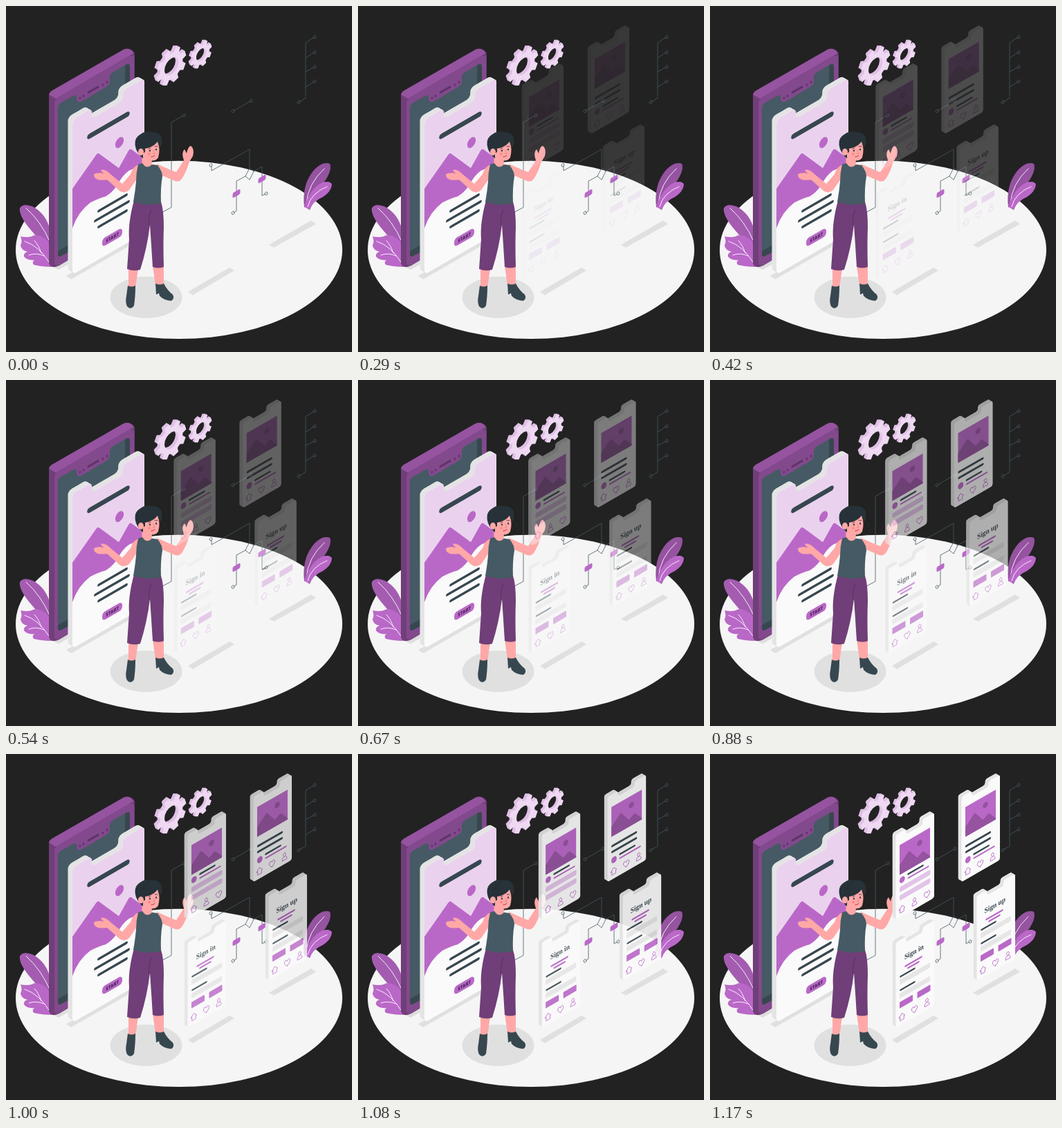
Recreate the animation shown at these times as an HTML page with a canvas. Size 500 by 500 pixels, loop 1210 ms.

```html
<!DOCTYPE html>
<html lang="en">
<head>
<meta charset="utf-8">
<title>App screens</title>
<style>
html, body { margin: 0; width: 100%; height: 100%; overflow: hidden; background: #222; }
canvas { position: absolute; left: 0; top: 0; width: 500px; height: 500px; }
</style>
</head>
<body>
<canvas id="scene"></canvas>
<canvas id="screens"></canvas>
<script>
const LOOP = 1210, SLOPE = 0.577;
const PURPLE = '#ba68c8', PLUM = '#9553a0', DEEP = '#703e78', LILAC = '#ead2ee';
const SLATE = '#455a64', INK = '#37474f', HAIR = '#263238', SKIN = '#ffa8a7', SHADE = '#e0e0e0';
const ratio = window.devicePixelRatio || 1;

function makeContext(id) {
  const canvas = document.getElementById(id);
  canvas.width = canvas.height = 500 * ratio;
  const ctx = canvas.getContext('2d');
  ctx.scale(ratio, ratio);
  ctx.lineCap = ctx.lineJoin = 'round';
  return ctx;
}
const scene = makeContext('scene'), screens = makeContext('screens');
let c = scene;

function fill(color, path) {
  c.fillStyle = color;
  c.fill(new Path2D(path));
}
function stroke(color, width, path) {
  c.strokeStyle = color;
  c.lineWidth = width;
  c.stroke(new Path2D(path));
}
function oval(color, x, y, rx, ry = rx, angle = 0) {
  c.fillStyle = color;
  c.beginPath();
  c.ellipse(x, y, rx, ry, angle, 0, 7);
  c.fill();
}
function pill(color, x, y, w, h, r) {
  c.fillStyle = color;
  c.beginPath();
  c.roundRect(x, y, w, h, r);
  c.fill();
}
const bar = (color, u1, u2, v, width) => stroke(color, width, `M${u1} ${v}H${u2}`);

// Runs draw() on the left-facing isometric plane with its origin at x, y.
function onPlane(x, y, draw) {
  c.save();
  c.transform(1, -SLOPE, 0, 1, x, y);
  draw();
  c.restore();
}
function label(text, u, v, font, color) {
  c.save();
  c.translate(u, v);
  c.scale(0.866, 1);
  c.font = font;
  c.fillStyle = color;
  c.textAlign = 'center';
  c.fillText(text, 0, 0);
  c.restore();
}
function roundPolygon(points, r) {
  const path = new Path2D(), [a, b] = points;
  path.moveTo((a[0] + b[0]) / 2, (a[1] + b[1]) / 2);
  for (let i = 1; i <= points.length; i++) {
    const p = points[i % points.length], q = points[(i + 1) % points.length];
    path.arcTo(p[0], p[1], q[0], q[1], r);
  }
  path.closePath();
  return path;
}

// A thick notched sheet; draw() is clipped to its front.
function sheet(x, y, w, h, depth, draw) {
  const n1 = w * 0.27, n2 = w * 0.7, notch = w * 0.14;
  const outline = roundPolygon([[0, 0], [n1, 0], [n1, notch], [n2, notch], [n2, 0],
    [w, 0], [w, h], [0, h]], w * 0.055);
  for (let k = depth; k > 0; k -= 0.5) {
    onPlane(x - k, y - k * SLOPE, () => {
      c.fillStyle = k > depth - 0.5 ? '#ececec' : '#e4e4e4';
      c.fill(outline);
    });
  }
  onPlane(x, y, () => {
    c.fillStyle = '#fafafa';
    c.fill(outline);
    c.clip(outline);
    draw();
  });
}

function gear(x, y, r, depth) {
  const path = new Path2D(), teeth = 8, step = Math.PI * 2 / teeth;
  for (let i = 0; i < teeth; i++) {
    for (const [turn, k] of [[-0.32, 0.76], [-0.22, 1], [0.22, 1], [0.32, 0.76]]) {
      const a = (i + turn + 0.6) * step;
      path.lineTo(r * k * Math.cos(a), r * k * Math.sin(a));
    }
  }
  path.closePath();
  path.moveTo(r * 0.46, 0);
  path.arc(0, 0, r * 0.46, 0, 7);
  for (let k = depth; k >= 0; k -= 0.5) {
    c.save();
    c.transform(0.866, -0.5, 0, 1, x - k + depth / 2, y + (depth / 2 - k) * SLOPE);
    c.fillStyle = k ? '#dfc0e5' : '#eed8f2';
    c.fill(path, 'evenodd');
    c.restore();
  }
}

function wires() {
  const ink = SLATE, w = 0.8;
  stroke(ink, w, 'M255 159L239 168V291L224 299M330 151L352 138');
  stroke(ink, w, 'M444 46L433 53V133L425 138M444 68L433 75M444 89L433 95M444 110L433 117');
  stroke(ink, w, 'M297 232V238L352 207V234L346 246L333 253V296L330 298');
  stroke(ink, w, 'M346 246L352 251L358 239L352 234M358 239L370 232V274L374 272');
  const ends = [[257, 158], [328, 152], [354, 137], [446, 45], [446, 67], [446, 88],
    [446, 109], [423, 139], [296, 230], [328, 299], [376, 271]];
  for (const [x, y] of ends) {
    c.beginPath();
    c.ellipse(x, y, 1.8, 2.4, 0.5, 0, 7);
    c.stroke();
  }
  for (const [x, y] of [[333, 271], [370, 250]]) {
    onPlane(x, y, () => pill(PURPLE, -5.5, -3.7, 11, 7.4, 2));
  }
}

function leaves() {
  fill('#a45cb1', 'M64 352Q46 336 37 325Q18 303 20 292Q25 284 39 290Q59 301 64 325Z');
  stroke('#fff', 0.9, 'M29 292Q51 312 63 340');
  fill(PURPLE, 'M66 377Q52 377 40 374Q37 370 41 367Q30 368 26 362Q25 357 31 355Q22 353 21 346Q24 340 21 333Q30 335 37 333Q43 329 51 333Q64 339 66 354Z');
  stroke('#fff', 0.9, 'M27 340Q48 347 62 370M51 357Q47 345 41 339M55 361Q43 356 33 360');
  fill(PLUM, 'M431 291Q427 257 446 236Q458 224 468 228Q472 238 458 257Q443 270 440 291Z');
  stroke('#fff', 0.9, 'M460 235Q436 257 434 286');
  fill(PURPLE, 'M431 290Q440 263 457 255Q469 252 471 258Q470 268 458 276Q443 282 439 295Z');
  stroke('#fff', 0.9, 'M464 261Q441 270 436 290');
}

function phone() {
  fill('#dedede', 'M68 377L76 381L94 371L88 364Z');
  fill(DEEP, 'M62 130Q62 125 67 122L168 64Q174 60 180 63Q186 65 186 72V310L77 375Q64 381 62 371Z');
  fill(PLUM, 'M62 128Q63 124 67 122L168 64Q174 60 180 63L185 68L72 134Z');
  fill('#82498c', 'M70 141Q70 135 75 132L177 73Q185 69 185 77V310L77 374Q70 377 70 369Z');
  fill(SLATE, 'M75 148Q75 143 79 140L97 130Q102 127 102 132V135Q104 141 109 138L145 117Q150 114 150 108V103Q150 99 154 96L173 85Q179 81 179 88V304L80 361Q75 364 75 358Z');
  fill(INK, 'M172 86Q179 81 179 88V304L172 308Z');
  fill(INK, 'M75 354L90 346V356L80 361Q75 364 75 358Z');
  stroke('#5d3365', 2.8, 'M119 125L133 117');
  for (const [x, y] of [[107, 133], [112, 130], [140, 114], [146, 110]]) oval('#5d3365', x, y, 1.3, 1.7);
}

function homePage() {
  fill(SHADE, 'M87 390L94 395L202 333L196 327Z');
  sheet(96, 164, 104, 224, 6.5, () => {
    fill(LILAC, 'M0 0H104V180H0Z');
    fill(PURPLE, 'M0 100L34 71Q36 69 38 71L67 109L81 92Q83 90 85 92L104 117V190H0Z');
    fill('#fafafa', 'M0 157Q8 138 26 135Q38 136 48 139Q57 139 64 133Q72 122 82 121Q94 122 104 130V224H0Z');
    oval(PURPLE, 68, 72.5, 6.2, 7.2);
    bar(INK, 25, 79, 38.4, 7.5);
    bar(INK, 38, 78, 154, 3.8);
    bar(INK, 33, 81, 165.5, 3.8);
    bar(INK, 38, 78, 177, 3.8);
    pill(PURPLE, 43, 197.5, 29, 12, 5);
    label('START', 57.7, 206.2, '800 7px "Open Sans", sans-serif', '#4a2a55');
  });
}

function woman() {
  fill(SKIN, 'M177 379L191 380L187 407H177ZM212 376L228 374V403H216Z');
  fill(INK, 'M176 404Q181 407 187 404Q187 420 185 433Q180 440 175 434Q172 428 174 419Z');
  fill(INK, 'M216 401Q222 404 228 401Q233 411 241 417Q244 423 239 426Q229 426 222 419L221 415L217 417Z');
  fill(DEEP, 'M185 281Q176 314 178 337L175 380Q184 384 194 381Q204 350 208 316Q210 345 212 377Q220 380 228 377Q227 346 228 319Q228 295 224 283Z');
  stroke('#55305d', 0.8, 'M207 318Q205 304 210 295');
  fill(SKIN, 'M192 229Q183 232 180 243L168 257L151 243Q143 235 137 237Q138 240 142 242Q132 240 127 243Q126 248 133 251Q140 252 146 251L164 267Q171 272 178 266L191 247Z');
  fill(SKIN, 'M218 228Q237 237 246 240L257 223Q253 212 258 207L261 213Q263 203 267 202Q273 207 270 217L265 225Q260 241 254 250Q249 256 242 252L221 243Z');
  fill(SKIN, 'M197 212H210L211 230Q203 238 196 229Z');
  fill(SLATE, 'M191 229L197 227Q203 237 211 229L219 230Q226 239 226 246Q223 263 224 285Q204 290 184 283Q187 266 188 253Q188 241 191 229Z');
  fill(SKIN, 'M197 200Q211 192 220 196Q223 208 220 219Q216 225 207 223Q197 218 197 205Z');
  fill(HAIR, 'M198 220Q192 216 188 207Q183 191 195 185Q200 181 209 182Q223 182 225 191Q227 199 222 206L219 196Q213 204 201 206L201 211L198 213Z');
  oval(SKIN, 195, 211, 4, 5);
  oval(HAIR, 208, 209, 1, 1.4);
  oval(HAIR, 217, 207.5, 1, 1.4);
  stroke(HAIR, 0.8, 'M206 206L209 205M215 203L219 203');
  stroke('#e07f80', 0.8, 'M213 208L215 213H212');
  stroke('#9c3038', 0.9, 'M210 218Q213 218 215 216');
  oval('#ff8989', 207, 214, 2.2, 1.7);
}

function drawScene() {
  c = scene;
  fill('#222', 'M0 0H500V500H0Z');
  oval('#f5f5f5', 250, 352.4, 236, 128.7);
  oval(SHADE, 202.5, 421, 52, 30);
  fill(SHADE, 'M263 413L323 378L330 382L270 418ZM380 345L441 310L448 315L387 349Z');
  leaves();
  phone();
  homePage();
  gear(237, 86, 25, 4);
  gear(280.5, 69.5, 18, 3);
  wires();
  woman();
}

const icons = {
  home: 'M-5 0L0 -5L5 0H3.2V5H-3.2V0Z',
  heart: 'M0 5Q-8 -1 -3 -4.5Q-1 -5 0 -2Q1 -5 3 -4.5Q8 -1 0 5Z',
  person: 'M0 -5.5A2.3 2.6 0 1 0 0.01 -5.5M-3.8 5V3Q-3 0 0 0Q3 0 3.8 3V5Z'
};
function iconRow(names) {
  names.forEach((name, i) => {
    c.save();
    c.translate(9 + 18 * i, 112);
    c.scale(0.87, 0.95);
    stroke(PURPLE, 0.85, icons[name]);
    c.restore();
  });
}
function picture() {
  fill(PURPLE, 'M5.5 18H49.5V61H5.5Z');
  fill(PLUM, 'M5.5 47L18 35Q19 34 20 35L31 51L38 47Q39.5 46 41 48L49.5 59V61H5.5Z');
  oval(PLUM, 34.5, 31.5, 3.7, 4.2);
}
function author(v) {
  oval(PURPLE, 9.3, v, 3.9, 4.5);
  bar(INK, 18, 39, v - 3, 2.6);
  bar(PURPLE, 18, 47, v + 2.8, 2.2);
}
function form(title) {
  label(title, 26.3, 32, 'bold 10.8px "Liberation Serif", serif', INK);
  bar(PURPLE, 14, 37, 42, 2.5);
  bar(PURPLE, 18, 33, 47, 2.5);
  for (const v of [53, 72.5]) {
    bar(INK, 7, 27, v, 2.5);
    pill('#e6e6e6', 5.5, v + 4.2, 44, 7.5, 1);
  }
  pill(PURPLE, 5.5, 89.5, 19, 9, 0.8);
  pill(PURPLE, 31, 89.5, 19, 9, 0.8);
  iconRow(['home', 'heart', 'person']);
}
function feed() {
  picture();
  author(70);
  pill('#e3c3e9', 5.5, 79, 44.5, 7.5, 2);
  pill('#e3c3e9', 5.5, 91, 44.5, 7.5, 2);
  iconRow(['home', 'person', 'heart']);
}
function article() {
  picture();
  bar(INK, 7, 41, 75, 3.2);
  bar(INK, 7, 41, 83.5, 3.2);
  author(96);
  iconRow(['home', 'heart', 'person']);
}

function drawScreens(shift) {
  c = screens;
  c.clearRect(0, 0, 500, 500);
  c.save();
  c.translate(shift, 0);
  const screen = (x, y, draw) => sheet(x, y, 55.5, 123, 4.8, draw);
  screen(363.5, 62, article);
  screen(268.5, 116.8, feed);
  screen(385.5, 205, () => form('Sign up'));
  screen(268.5, 272.5, () => form('Sign in'));
  c.restore();
}

// cubic-bezier(.42, 0, 1, 1)
function easeIn(x) {
  let low = 0, high = 1;
  for (let i = 0; i < 24; i++) {
    const s = (low + high) / 2;
    if (1.26 * s * (1 - s) ** 2 + 3 * s * s * (1 - s) + s ** 3 < x) low = s;
    else high = s;
  }
  return 3 * low * low * (1 - low) + low ** 3;
}

const start = performance.now();
function tick() {
  const time = Math.max(0, performance.now() - start) % LOOP;
  const progress = easeIn(Math.min(1, (time + 12) / 1160));
  drawScreens(-30 * (1 - progress));
  screens.canvas.style.opacity = progress;
  requestAnimationFrame(tick);
}
drawScene();
tick();
</script>
</body>
</html>
```
